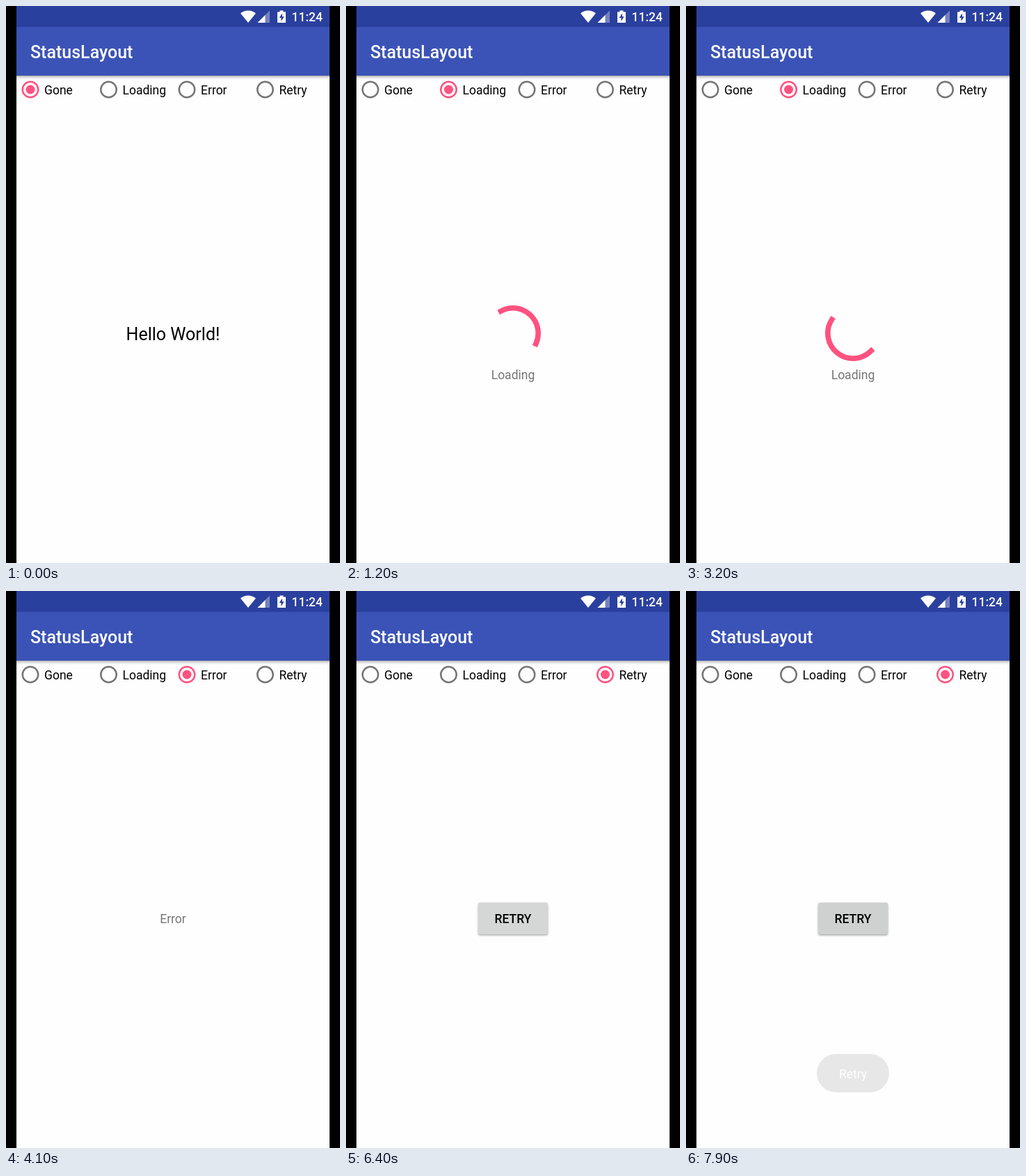
Recreate the animation shown at these times as an HTML page. Size 480 by 800 pixels, loop 8000 ms.

```html
<!DOCTYPE html>
<html lang="en">
<head>
<meta charset="utf-8">
<title>StatusLayout</title>
<style>
  html, body { margin: 0; width: 100%; height: 100%; overflow: hidden; background: #000; }
  svg { display: block; width: 480px; height: 800px; }
  text { font: 17.5px Roboto, sans-serif; }
  .medium { font-weight: 500; }
  .large { font-size: 25px; }
  .middle { text-anchor: middle; }
  .muted { fill: #757575; }
</style>
</head>
<body>
<svg viewBox="0 0 480 800">
  <defs>
    <linearGradient id="barShadow" x2="0" y2="1">
      <stop offset="0" stop-opacity=".34"/>
      <stop offset=".4" stop-opacity=".12"/>
      <stop offset="1" stop-opacity="0"/>
    </linearGradient>
    <filter id="soft" x="-10%" y="-20%" width="120%" height="150%">
      <feGaussianBlur stdDeviation="1.4"/>
    </filter>
    <clipPath id="below"><path d="M15 100h450v700h-450z"/></clipPath>
  </defs>
  <rect width="480" height="800"/>
  <rect x="15" width="450" height="800" fill="#fefefe"/>
  <rect x="15" width="450" height="30" fill="#2a409f"/>
  <rect x="15" y="30" width="450" height="70" fill="#3b53b6"/>
  <rect x="15" y="100" width="450" height="6" fill="url(#barShadow)"/>

  <g fill="#fff">
    <path d="M348 24L337 10.4Q342 6.5 348 6.5T359 10.4Z"/>
    <path d="M361.5 24H379V6.5Z" opacity=".35"/>
    <path d="M361.5 24H372.5V13Z"/>
    <path d="M393.5 6.5h5v2h3.5v15.5h-12v-15.5h3.5z"/>
    <path d="M397 10.5l-4.3 6.6h2.7v4.9l4.3-6.7h-2.7z" fill="#2a409f"/>
    <text class="medium" x="410.5" y="22">11:24</text>
    <text class="medium large" x="35" y="75">StatusLayout</text>
  </g>

  <g id="radios" clip-path="url(#below)"></g>

  <text id="gone" class="large middle" x="240" y="480">Hello World!</text>
  <g id="loading">
    <path id="arc" fill="none" stroke="#ff5280" stroke-width="7.6" stroke-linecap="square"/>
    <text class="muted middle" x="240" y="536">Loading</text>
  </g>
  <text id="error" class="muted middle" x="240" y="477">Error</text>
  <g id="retry">
    <rect id="buttonShadow" x="190" y="449" width="100" height="45.5" rx="2.5" filter="url(#soft)"/>
    <rect x="190" y="447.5" width="100" height="45.5" rx="2.5" fill="#d5d7d6"/>
    <rect id="pressed" x="190" y="447.5" width="100" height="45.5" rx="2.5"/>
    <text class="medium middle" x="240" y="477">RETRY</text>
  </g>
  <g id="toast">
    <rect x="188" y="665" width="104" height="55" rx="27.5" fill="#323232" opacity=".11"/>
    <text class="middle" x="240" y="699.5" fill="#fff">Retry</text>
  </g>
</svg>
<script>
const LOOP = 8000, STEP = 100;
const PINK = '#ff5280', GRAY = '#757575';
const CYCLE = 1333, SPIN = 4444;

// Each state is entered on release; the press comes shortly before.
const states = [
  { id: 'gone', label: 'Gone', press: -2000, enter: -1800 },
  { id: 'loading', label: 'Loading', press: 100, enter: 270 },
  { id: 'error', label: 'Error', press: 3600, enter: 3650 },
  { id: 'retry', label: 'Retry', press: 5500, enter: 5650 }
];

const $ = id => document.getElementById(id);
const clamp = v => Math.min(1, Math.max(0, v));
const ramp = (t, from, to) => clamp((t - from) / (to - from));
const easeOut = v => 1 - (1 - v) ** 2;

function svg(tag, attrs, parent) {
  const el = document.createElementNS('http://www.w3.org/2000/svg', tag);
  set(el, attrs);
  return parent.appendChild(el);
}
function set(el, attrs) {
  for (const key in attrs) el.setAttribute(key, attrs[key]);
}
function show(el, opacity) {
  el.style.display = opacity > 0 ? '' : 'none';
  el.style.opacity = opacity;
}

states.forEach((state, i) => {
  const cx = 35 + 112.5 * i, cy = 120, group = $('radios');
  state.view = $(state.id);
  state.exit = i + 1 < states.length ? states[i + 1].enter : Infinity;
  state.ripple = svg('circle', { cx: cx + 3.5, cy: cy + 3.5 }, group);
  state.ring = svg('circle', { cx, cy, r: 11.25, fill: 'none', 'stroke-width': 2.5 }, group);
  state.dot = svg('circle', { cx, cy, fill: PINK }, group);
  svg('text', { x: cx + 20, y: 127 }, group).textContent = state.label;
});

// Cubic easing between (x0, 0) and (x3, 1), solved by bisection.
function curve(x, x0, x1, x2, x3) {
  if (x <= x0) return 0;
  if (x >= x3) return 1;
  let lo = 0, hi = 1, u;
  for (let i = 0; i < 24; i++) {
    u = (lo + hi) / 2;
    const v = 1 - u;
    const at = x0 * v ** 3 + 3 * x1 * u * v * v + 3 * x2 * u * u * v + x3 * u ** 3;
    if (at < x) lo = u; else hi = u;
  }
  return u * u * (3 - 2 * u);
}

function drawSpinner(t) {
  const time = Math.max(0, (t - 328) * 1.0225);
  const phase = time % CYCLE / CYCLE;
  const base = 90 * phase + 720 * time / SPIN;
  const start = base + 270 * curve(phase, .5, .7, .6, 1);
  const end = Math.max(start + .2, base + 270 * curve(phase, 0, .2, .1, .5));
  const point = deg => {
    const a = deg * Math.PI / 180;
    return `${240 + 36.2 * Math.sin(a)} ${470 - 36.2 * Math.cos(a)}`;
  };
  set($('arc'), { d: `M${point(start)}A36.2 36.2 0 ${end - start > 180 ? 1 : 0} 1 ${point(end)}` });
}

function drawState(state, t) {
  const { press, enter, exit } = state;
  const selected = t >= enter && t < exit;
  const fadeIn = easeOut(ramp(t, enter, enter + 400));
  const fadeOut = exit === Infinity ? 0 : easeOut(ramp(t, exit, exit + 400));
  show(state.view, fadeIn * (1 - fadeOut));

  const grow = ramp(t, enter, enter + 200);
  const shrink = exit === Infinity ? 0 : ramp(t, exit, exit + 150);
  set(state.ring, { stroke: selected ? PINK : GRAY });
  set(state.dot, { r: 6.5 * grow * (1 - shrink) });
  set(state.ripple, { r: 15 + 4 * ramp(t, enter, enter + 300) });
  show(state.ripple, t < press ? 0 : .05 * (1 - ramp(t, enter, enter + 350)));
}

function draw(t) {
  states.forEach(state => drawState(state, t));
  drawSpinner(t);

  const press = ramp(t, 7100, 7300) * (1 - .65 * ramp(t, 7700, 7900));
  show($('pressed'), .08 * press);
  show($('buttonShadow'), .34 + .08 * press);
  show($('toast'), t >= 7900 ? 1 : 0);
}

function tick(now) {
  draw(Math.floor(now % LOOP / STEP) * STEP);
  requestAnimationFrame(tick);
}
draw(0);
requestAnimationFrame(tick);
</script>
</body>
</html>
```
